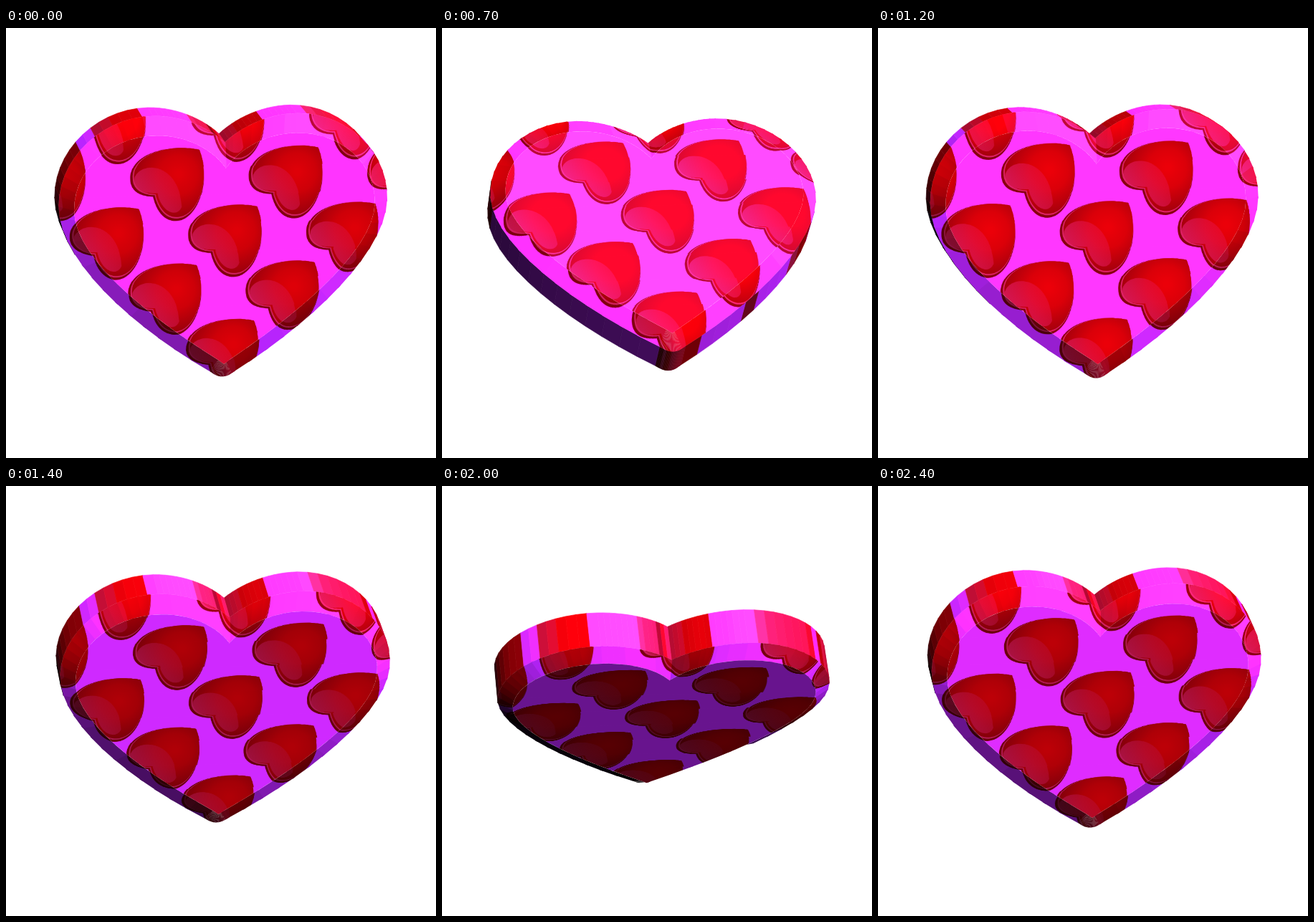
Write an HTML page with a canvas that moves like this. It is 600 px wide and 600 px high and loops after 2.5 s.

```html
<!DOCTYPE html>
<html>
<head>
<meta charset="utf-8">
<style>
html, body { margin: 0; width: 100%; height: 100%; overflow: hidden; background: #fff; }
canvas { display: block; }
</style>
</head>
<body>
<canvas id="stage" width="600" height="600"></canvas>
<script>
const ctx = document.getElementById('stage').getContext('2d');

// Depths of the back, the rim and the front face
const BACK = -28, RIM = 25, FRONT = 37, DISTANCE = 4500;
const TEX = { x: -240, y: -200, w: 480, h: 400, scale: 1.5 };
const LIGHT = [0.5, -0.64, 0.77];
const GLOSS = [20, 8, 35];
const SAMPLE_LEVEL = 0.6875;

// Lit colour; a gloss is added where the light is strongest
function css(rgb, level, alpha = 1) {
  const gloss = Math.min(1, Math.max(0, (level - 1.285) * 36));
  const lit = rgb.map((c, i) => Math.min(255, Math.round(c * level + GLOSS[i] * gloss)));
  return `rgba(${lit.join()},${alpha})`;
}

// Right half of a heart: cubic curves from the notch to the tip, then mirrored
function heartOutline(start, curves, steps = 14) {
  const half = [start];
  let p = start;
  for (const [a, b, c, d, e, f] of curves) {
    for (let i = 1; i <= steps; i++) {
      const t = i / steps, s = 1 - t;
      const mix = (q, r, u, w) => s * s * s * q + 3 * s * s * t * r + 3 * s * t * t * u + t * t * t * w;
      half.push([mix(p[0], a, c, e), mix(p[1], b, d, f)]);
    }
    p = [e, f];
  }
  return half.concat(half.slice(1, -1).reverse().map(([x, y]) => [-x, y]));
}

const outer = heartOutline([0, -151], [
  [25, -174, 62, -190, 100, -190],
  [168, -190, 230, -135, 230, -65],
  [230, 10, 130, 108, 18, 178],
  [11, 183, 7, 186, 0, 186]]);
const inner = heartOutline([0, -117], [
  [20, -146, 58, -165, 97, -165],
  [158, -165, 210, -122, 210, -62],
  [210, 0, 120, 83, 8, 158],
  [5, 160, 3, 162, 0, 164]]);

const smallHeart = new Path2D(
  'M0 0C-35-9-96 0-96 39C-96 58-80 64-64 65C-60 83-50 100-32 100C-2 100 18 46 0 0Z');
const shine = new Path2D(
  'M-90 38C-82 14-28 16-24 80C-30 96-52 88-58 60C-76 60-92 56-90 38Z');

function drawSmallHeart(g, level) {
  const layer = (size, fill) => {
    g.save();
    g.scale(size, size);
    g.fillStyle = fill;
    g.fill(smallHeart);
    g.restore();
  };
  const red = g.createRadialGradient(-30, 36, 4, -34, 38, 66);
  red.addColorStop(0, css([215, 0, 8], level));
  red.addColorStop(0.4, css([200, 0, 8], level));
  red.addColorStop(1, css([145, 0, 12], level));
  const pink = g.createLinearGradient(-80, 66, -28, 32);
  pink.addColorStop(0, css([212, 30, 105], level, 0.7));
  pink.addColorStop(1, css([212, 20, 80], level, 0.25));
  layer(1, css([125, 0, 14], level));
  layer(0.965, css([205, 30, 95], level));
  layer(0.945, red);
  g.fillStyle = pink;
  g.fill(shine);
}

// Pattern under a given light level
const textures = {};
function texture(level) {
  const key = Math.round(level * 32);
  if (textures[key]) return textures[key];
  level = key / 32;
  const canvas = document.createElement('canvas');
  canvas.width = TEX.w * TEX.scale;
  canvas.height = TEX.h * TEX.scale;
  const g = canvas.getContext('2d');
  g.fillStyle = css([255, 50, 350], level);
  g.fillRect(0, 0, canvas.width, canvas.height);
  g.scale(TEX.scale, TEX.scale);
  g.translate(-TEX.x, -TEX.y);
  for (let row = -2; row < 5; row++) {
    for (let col = -4; col < 6; col++) {
      if ((row + col) % 2) continue;
      g.save();
      g.translate(-35.5 + 82.5 * col - 1.3 * row, -144 + 82 * row);
      drawSmallHeart(g, level);
      g.restore();
    }
  }
  return textures[key] = canvas;
}

const facets = outer.map((a, i) => {
  const j = (i + 1) % outer.length, b = outer[j];
  const dx = b[0] - a[0], dy = b[1] - a[1], len = Math.hypot(dx, dy);
  const mid = [(a[0] + b[0]) / 2, (a[1] + b[1]) / 2];
  const pixel = texture(SAMPLE_LEVEL).getContext('2d').getImageData(
    (mid[0] - TEX.x) * TEX.scale, (mid[1] - TEX.y) * TEX.scale, 1, 1).data;
  return {
    a, b, c: inner[j], d: inner[i],
    out: [dy / len, -dx / len],
    rgb: [...pixel].slice(0, 3).map(v => v / SAMPLE_LEVEL)
  };
});

let axes;
function setPose(angle) {
  const c = Math.cos(angle), s = Math.sin(angle);
  const down = [0.03, 1, 0], normal = [0.15, 0, 0.988];
  axes = [
    [0.988, -0.025, -0.15],
    down.map((v, i) => c * v + s * normal[i]),
    down.map((v, i) => c * normal[i] - s * v)
  ];
}

const rotate = (x, y, z) => [0, 1, 2].map(i => x * axes[0][i] + y * axes[1][i] + z * axes[2][i]);

function project([x, y], z) {
  const p = rotate(x, y, z), k = 1 / (1 - p[2] / DISTANCE);
  return [300 + p[0] * k, 301 + p[1] * k];
}

function lightLevel(n) {
  const dot = n.reduce((sum, v, i) => sum + v * LIGHT[i], 0);
  return Math.max(0.04, Math.min(1.42, 0.5 + 0.82 * dot));
}

function tracePath(points) {
  ctx.beginPath();
  points.forEach(p => ctx.lineTo(...p));
  ctx.closePath();
}

// Map three flat pattern points onto three stage points
function mapPlane([a, b, c], [p, q, r]) {
  const x1 = b[0] - a[0], y1 = b[1] - a[1], x2 = c[0] - a[0], y2 = c[1] - a[1];
  const det = x1 * y2 - x2 * y1;
  const solve = k => {
    const u = q[k] - p[k], v = r[k] - p[k];
    const mx = (u * y2 - v * y1) / det, my = (v * x1 - u * x2) / det;
    return [mx, my, p[k] - mx * a[0] - my * a[1]];
  };
  const h = solve(0), v = solve(1);
  ctx.transform(h[0], v[0], h[1], v[1], h[2], v[2]);
}

function drawWall({ a, b, out, rgb }) {
  const n = rotate(out[0], out[1], 0);
  if (n[2] <= 0) return;
  tracePath([project(a, BACK), project(b, BACK), project(b, RIM), project(a, RIM)]);
  ctx.fillStyle = ctx.strokeStyle = css(rgb, lightLevel(n));
  ctx.lineWidth = 0.7;
  ctx.fill();
  ctx.stroke();
}

function drawBevel({ a, b, c, d, out }) {
  const n = rotate(out[0] * 0.58, out[1] * 0.58, 0.81);
  if (n[2] <= 0) return;
  const [p, q, r, s] = [project(a, RIM), project(b, RIM), project(c, FRONT), project(d, FRONT)];
  // Reach a little under the next facet to hide the seam
  const beyond = (from, to) => to.map((v, i) => v + (v - from[i]) * 0.2);
  ctx.save();
  tracePath([p, beyond(p, q), beyond(s, r), s]);
  ctx.clip();
  mapPlane([a, b, d], [p, q, s]);
  ctx.drawImage(texture(lightLevel(n)), TEX.x, TEX.y, TEX.w, TEX.h);
  ctx.restore();
}

// The face is laid in bands so that the perspective stays right
function drawFace() {
  const image = texture(lightLevel(axes[2])), band = 40, s = TEX.scale;
  ctx.save();
  tracePath(inner.map(p => project(p, FRONT)));
  ctx.clip();
  for (let y = TEX.y; y < TEX.y + TEX.h; y += band) {
    const h = Math.min(band + 2, TEX.y + TEX.h - y);
    const corners = [[-230, y], [230, y], [-230, y + band]];
    ctx.save();
    mapPlane(corners, corners.map(p => project(p, FRONT)));
    ctx.drawImage(image, 0, (y - TEX.y) * s, TEX.w * s, h * s, TEX.x, y, TEX.w, h);
    ctx.restore();
  }
  ctx.restore();
}

const began = performance.now();
function frame() {
  const step = Math.floor(Math.max(0, performance.now() - began) / 100) % 25;
  setPose(-0.2566 + 0.8116 * Math.sin(2 * Math.PI * step / 25));
  ctx.fillStyle = '#fff';
  ctx.fillRect(0, 0, 600, 600);
  facets.forEach(drawWall);
  facets.forEach(drawBevel);
  drawFace();
  requestAnimationFrame(frame);
}
frame();
</script>
</body>
</html>
```
